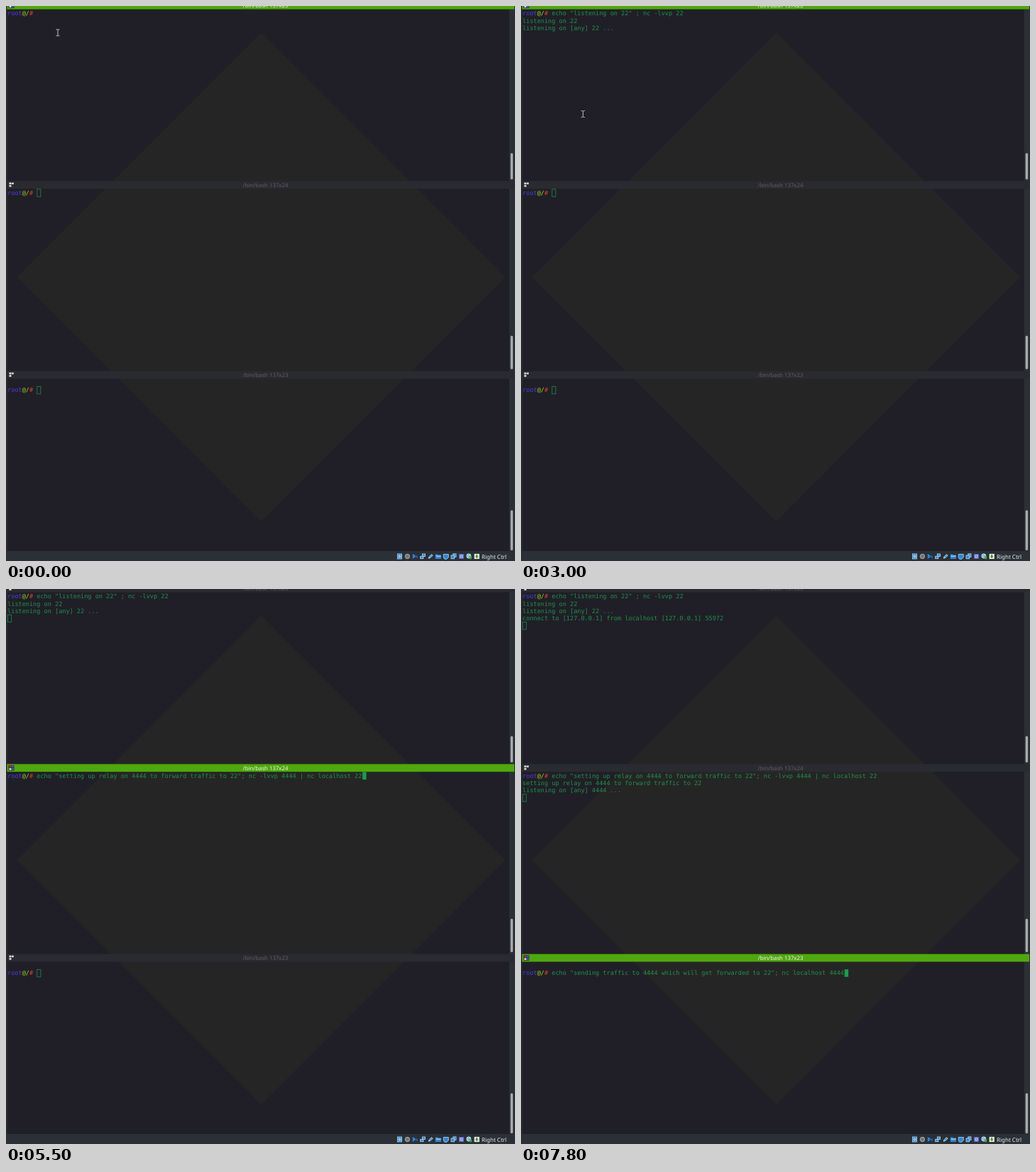
An HTML page for the animation above (8 s loop, 717 px wide and 781 px high).

```html
<!DOCTYPE html>
<html lang="en">
<head>
<meta charset="utf-8">
<title>Terminal relay</title>
<style>
  html, body { margin: 0; width: 100%; height: 100%; overflow: hidden; background: #201f27; }
  svg { display: block; width: 717px; height: 781px; }
  text { text-rendering: geometricPrecision; white-space: pre; }
  .mono { font: 8.563px "DejaVu Sans Mono", monospace; fill: #21914a; }
  .ui { font: 7.8px "Noto Sans", sans-serif; }
  .user { fill: #4b3fdc; }
  .at { fill: #a2d51c; }
  .hash { fill: #d8452c; }
  .block { fill: #1f9a4e; }
  .hollow { fill: none; stroke: #237c4b; stroke-width: .9; }
</style>
</head>
<body>
<svg id="stage" viewBox="0 0 717 781">
  <rect width="717" height="781" fill="#201f27"/>
  <path d="M359.5 37.5L703.5 381.5L359.5 725.5L15.5 381.5Z" fill="#252525"/>
  <path d="M0 0H1.5V767H709V0H717V781H0Z" fill="#2b3036"/>
  <g id="panes"></g>
  <g id="status"></g>
  <g id="pointer">
    <path d="M-2.5 -4.5H-.8L0 -3.8L.8 -4.5H2.5M0 -3.8V3.8M-2.5 4.5H-.8L0 3.8L.8 4.5H2.5"
      fill="none" stroke="#15151a" stroke-width="2.4"/>
    <path d="M-2.5 -4.5H-.8L0 -3.8L.8 -4.5H2.5M0 -3.8V3.8M-2.5 4.5H-.8L0 3.8L.8 4.5H2.5"
      fill="none" stroke="#d4d4d4" stroke-width="1"/>
  </g>
</svg>
<script>
const LOOP = 8000, CELL = 5.155, LINE = 10.3, LEFT = 2.1, PROMPT = 8;

// times: "from-to" windows in ms, separated by spaces
const shown = times => times ? ` data-show="${times}"` : '';

const rect = (x, y, w, h, fill, more = '') =>
  `<rect x="${x}" y="${y}" width="${w}" height="${h}" fill="${fill}"${more}/>`;

const line = (top, row, text, times, col = 0) =>
  `<text class="mono" x="${LEFT + col * CELL}" y="${top + row * LINE + 8.2}"${shown(times)}>${text}</text>`;

const block = (top, row, col, times) =>
  `<rect class="block" x="${LEFT + col * CELL}" y="${top + row * LINE}" width="5.4" height="10.6"${shown(times)}/>`;

const hollow = (top, row, col, times) =>
  `<rect class="hollow" x="${LEFT + col * CELL + .4}" y="${top + row * LINE + .2}" width="5.1" height="10.4"${shown(times)}/>`;

const prompt = top => line(top, 0,
  '<tspan class="user">root</tspan><tspan class="at">@/</tspan><tspan class="hash">#</tspan>');

function titleBar(y, size, active) {
  const bar = (fill, ink, squares, times) => `<g${shown(times)}>
    ${rect(1.5, y, 714.5, 10.8, fill)}
    <text class="ui" x="365.6" y="${y + 8.3}" text-anchor="middle" fill="${ink}">/bin/bash 137x${size}</text>
    ${squares}</g>`;
  const idle = rect(4.5, y + 2, 3, 2.6, '#ddd') + rect(8.2, y + 2, 2.6, 2.6, '#ddd') +
    rect(4.5, y + 5.5, 3, 2.6, '#ddd');
  const busy = rect(3.5, y + 1.5, 8, 7.5, '#25252b') + rect(4.5, y + 2, 3, 2.8, '#c3342d') +
    rect(8, y + 2, 3, 2.8, '#3b57c4') + rect(4.5, y + 5.7, 3, 2.6, '#ddd') + rect(8, y + 5.7, 3, 2.6, '#3b57c4');
  return bar('#2a2a31', '#5e5e62', idle) + bar('#4fa80e', '#f4f8ee', busy, active);
}

const thumb = (y, h) => rect(710.7, y, 3.4, h, '#a9abad', ' rx="1.6"');

const commands = [
  'echo "listening on 22" ; nc -lvvp 22',
  'echo "setting up relay on 4444 to forward traffic to 22"; nc -lvvp 4444 | nc localhost 22',
  'echo "sending traffic to 4444 which will get forwarded to 22"; nc localhost 4444'
];
const ends = commands.map(c => PROMPT + c.length);
const [A, B, C] = [5.2, 257.6, 535.2];

document.getElementById('panes').innerHTML = [
  titleBar(-6.2, 23, '0-3100'),
  titleBar(246.4, 24, '3100-7000'),
  titleBar(513.7, 23, '7000-8000'),
  thumb(207, 37), thumb(464, 47), thumb(709.5, 56.5),

  prompt(A),
  line(A, 0, commands[0], '1000-8000', PROMPT),
  line(A, 1, 'listening on 22', '2000-8000'),
  line(A, 2, 'listening on [any] 22 ...', '2000-8000'),
  line(A, 3, 'connect to [127.0.0.1] from localhost [127.0.0.1] 55972', '5600-8000'),
  block(A, 0, PROMPT, '500-1000'),
  block(A, 0, ends[0], '1000-1700'),
  block(A, 3, 0, '2000-2700'),
  hollow(A, 3, 0, '3100-5600'),
  hollow(A, 4, 0, '5600-8000'),

  prompt(B),
  line(B, 0, commands[1], '4300-8000', PROMPT),
  line(B, 1, 'setting up relay on 4444 to forward traffic to 22', '5600-8000'),
  line(B, 2, 'listening on [any] 4444 ...', '5600-8000'),
  hollow(B, 0, PROMPT, '0-3100'),
  block(B, 0, PROMPT, '3100-3800'),
  block(B, 0, ends[1], '4300-4900 5500-5600'),
  block(B, 3, 0, '5600-6200 6800-7000'),
  hollow(B, 3, 0, '7000-8000'),

  prompt(C),
  line(C, 0, commands[2], '7800-8000', PROMPT),
  hollow(C, 0, PROMPT, '0-7000'),
  block(C, 0, PROMPT, '7000-7600'),
  block(C, 0, ends[2], '7800-8000')
].join('');

// Status icons, each drawn around its own centre
const BLUE = '#2f86d6', PALE = '#b9dcf5';
const screen = (x, y, w, h, fill = BLUE) => rect(x, y, w, h, fill, ` stroke="${PALE}" stroke-width=".8"`);
const icons = [
  screen(-3, -3.5, 6, 7) + `<circle r="1.9" fill="${PALE}"/><circle r=".8" fill="${BLUE}"/>`,
  '<circle r="3.7" fill="#8d9092"/><circle r="1.3" fill="#33363a"/><circle r=".6" fill="#ccc"/>',
  `<path d="M-3.5 -3.5V3.5L0 1V-1.5Z" fill="${BLUE}"/><path d="M0 -1.5L3.5 -1V3L0 1Z" fill="#1d5f9e"/>`,
  screen(-.8, -3.5, 4.2, 3.6) + screen(-3.5, -.2, 4.2, 3.4) +
    rect(-.5, .5, 5, 5, '#7fd0ff', shown('100-200 3500-3600 4200-4300 7500-7600')),
  `<path d="M-3.3 3.3L-2.5 .5L1.5 -3.2L3.5 -1.3L-.5 2.5Z" fill="${PALE}"/><path d="M-1.5 1.5L2 -1.8" stroke="${BLUE}" stroke-width="1.3"/>`,
  `<path d="M-4 -3H-.8L0 -2H4V3.5H-4Z" fill="${BLUE}"/>` + rect(-3.3, -1, 7, 1.2, PALE),
  `<path d="M-3.5 -3H3.5V1.5L1 3.8H-2L-3.5 1.5Z" fill="${BLUE}" stroke="${PALE}" stroke-width=".8"/>`,
  screen(-.8, -3.6, 4.2, 4.5) + screen(-3.6, -1.5, 4.6, 4.8),
  rect(-3.5, -3.5, 7, 7, '#5a67c4') + rect(-2, -2, 4, 4, '#d5daf4') + rect(-1, -1, 2, 2, '#5a67c4'),
  `<circle cx="-.5" cy="-.5" r="3.4" fill="${PALE}"/><path d="M-3 0L0 -3M-2 2L1.5 -1.5" stroke="${BLUE}"/><path d="M0 0H3.8V3.8H1Z" fill="#45a63b"/>`,
  rect(-3.6, -3.6, 7.2, 7.2, '#e8eee4') + '<path d="M-1 -2.5H1V0H2.5L0 2.8L-2.5 0H-1Z" fill="#3f8f2e"/>'
];
document.getElementById('status').innerHTML =
  icons.map((icon, i) => `<g transform="translate(${554.6 + i * 10.86} 774.5)">${icon}</g>`).join('') +
  '<text class="ui" x="670" y="777.6" fill="#eceded" style="font-size:8px">Right Ctrl</text>';

// Pointer steps: time, x, y; a time alone hides it
const pointerSteps = [
  [0, 73, 37.5], [900],
  [2800, 74, 42], [2900, 79, 85], [3000, 87.3, 152], [3100, 132.5, 323], [3200, 146, 425], [3300, 148.5, 455.5], [4200],
  [6600, 148.5, 455.5], [6800, 149, 478], [6900, 151, 530.5], [7000, 153, 575], [7100, 154, 595], [7700]
];

const pointer = document.getElementById('pointer');
const timed = [...document.querySelectorAll('[data-show]')].map(node => ({
  node, spans: node.dataset.show.split(' ').map(s => s.split('-').map(Number))
}));

function draw() {
  const t = performance.now() % LOOP;
  for (const { node, spans } of timed)
    node.style.display = spans.some(([from, to]) => t >= from && t < to) ? '' : 'none';
  const [, x, y] = pointerSteps.filter(step => step[0] <= t).pop();
  pointer.style.display = x === undefined ? 'none' : '';
  if (x !== undefined) pointer.setAttribute('transform', `translate(${x} ${y})`);
  requestAnimationFrame(draw);
}
draw();
</script>
</body>
</html>
```
